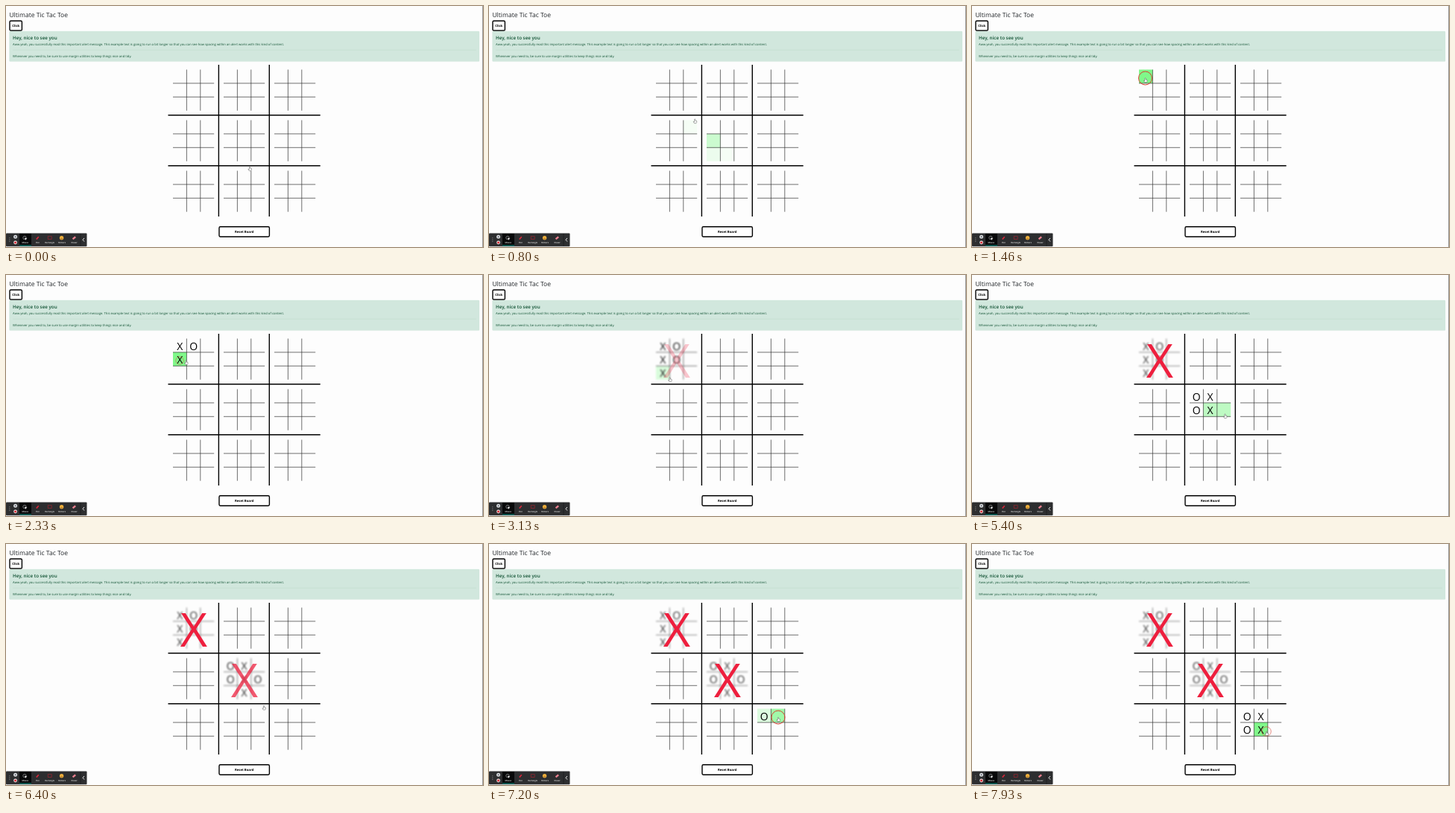
Animation, 640 px wide and 324 px high, one loop 8000 ms. Source, as an HTML page:

```html
<!DOCTYPE html>
<html lang="en">
<head>
<meta charset="utf-8">
<title>Ultimate Tic Tac Toe</title>
<style>
  html, body { margin: 0; width: 100%; height: 100%; overflow: hidden; background: #fdfdfd; }
  svg { display: block; width: 100vw; height: 100vh; }
  text { font-family: "Open Sans", "Noto Sans", sans-serif; text-rendering: geometricPrecision; }
  .alert { fill: #0f5132; font-size: 4.19px; }
  .button rect { fill: #fff; stroke: #000; stroke-width: 1.4; }
  .button text { font-size: 4.25px; font-weight: 700; text-anchor: middle; }
  .thick { stroke: #000; stroke-width: 1.4; }
  .thin { stroke: #333; stroke-width: .7; fill: none; }
  .mark { font-size: 14px; text-anchor: middle; }
  .winner { font-size: 63px; text-anchor: middle; fill: #ee1f3e; }
  .tools text { font-size: 2.7px; font-weight: 600; text-anchor: middle; fill: #eee; }
</style>
</head>
<body>
<svg viewBox="0 0 640 324" preserveAspectRatio="none">
  <rect width="640" height="324" fill="#fdfdfd"/>
  <rect x="639" width="1" height="324" fill="#999"/>
  <text x="4.4" y="15.3" font-size="8.56" fill="#212529">Ultimate Tic Tac Toe</text>
  <g class="button">
    <rect x="5" y="20" width="16.4" height="13" rx="1.6"/>
    <text x="13.2" y="28">Click</text>
    <rect x="286" y="296.8" width="67.4" height="13.4" rx="1.6"/>
    <text x="319.7" y="305">Reset Board</text>
  </g>
  <g class="alert">
    <rect x="4.6" y="34" width="630.4" height="40.6" rx="1" fill="#d1e7dd" stroke="#c4dfd3" stroke-width=".3"/>
    <path d="M9 59.2H631" stroke="#b5d2c5" stroke-width=".4"/>
    <text x="9" y="44.8" font-size="6.28" font-weight="600" style="font-size:6.28px">Hey, nice to see you</text>
    <text x="9" y="52.9">Aww yeah, you successfully read this important alert message. This example text is going to run a bit longer so that you can see how spacing within an alert works with this kind of content.</text>
    <text x="9" y="68.7">Whenever you need to, be sure to use margin utilities to keep things nice and tidy.</text>
  </g>

  <g id="boards"></g>
  <path class="thick" d="M285.4 79V283M353.3 79V283M217.5 146.8H421.7M217.5 214.8H421.7"/>

  <g class="tools">
    <rect y="305.5" width="108.5" height="17.8" rx="1" fill="#2d2e30"/>
    <rect x="18" y="306" width="16" height="17" fill="#08090a"/>
    <path d="M18 322H34" stroke="#0b9c8c"/>
    <path d="M4.8 311.5V318" stroke="#aaa" stroke-dasharray=".8 1.6"/>
    <circle cx="12.6" cy="310.2" r="2.5" fill="#d8dcdd"/>
    <circle cx="12.6" cy="310.2" r="1" fill="#667"/>
    <circle cx="12.6" cy="318" r="2.4" fill="#eee"/>
    <circle cx="12.6" cy="318" r="1.6" fill="#d8323c"/>
    <circle cx="25" cy="311.6" r="2.2" fill="none" stroke="#bbb" stroke-width=".6"/>
    <path d="M25 311.4l3.4 1.4-1.5.6-.6 1.6z" fill="#fff"/>
    <path d="M40.8 313.6l3-3.4" stroke="#d8283c" stroke-width="1.6"/>
    <rect x="56.2" y="309.8" width="5" height="3.8" fill="none" stroke="#a32632" stroke-width=".7"/>
    <circle cx="74.6" cy="311.8" r="2.7" fill="#eeb03c"/>
    <path d="M73.2 312.4q1.4 1.6 2.8 0" stroke="#74401c" stroke-width=".6" fill="none"/>
    <path d="M89.6 313.4l3.6-3" stroke="#f08090" stroke-width="2.4"/>
    <path d="M100 306V323" stroke="#17181a" stroke-width=".7"/>
    <path d="M105 312l-2 2.3 2 2.3" stroke="#fff" stroke-width=".9" fill="none"/>
    <text x="25.8" y="318.8">Mouse</text>
    <text x="42.4" y="318.8">Pen</text>
    <text x="58.6" y="318.8">Rectangle</text>
    <text x="75" y="318.8">Stickers</text>
    <text x="91.6" y="318.8">Eraser</text>
  </g>

  <circle id="ring" fill="none" stroke="#d8402f"/>
  <path id="cursor" d="M-.6 .2Q0-.6 .6 .2V2L2.5 2.5V4.2L1.7 5.6H-.8L-2.1 3.4L-.6 3.6Z" fill="#fff" stroke="#555" stroke-width=".5"/>
</svg>
<script>
const LOOP = 8000, CELL = 18.4, PITCH = 68, LEFT = 224, TOP = 85.5;
const HOVER_FADE = 300, WIN_FADE = 620;
const START = { arrive: 0, click: 250, x: 327, y: 216 };

// Pointer arrival time, click time and position of every move.
const moves = [
  [1300, 1500, 232.5, 97], [1750, 1860, 251, 97], [2100, 2220, 233, 115],
  [2450, 2560, 251, 115], [2800, 2930, 234, 134],
  [3820, 3930, 301, 164], [4180, 4420, 319, 165.5], [4650, 4760, 301, 183],
  [5000, 5140, 319, 183], [5380, 5560, 339.5, 187], [5820, 5990, 320, 201],
  [6780, 6880, 369, 232], [7100, 7220, 388, 233], [7440, 7540, 369, 250],
  [7740, 7850, 395, 252]
].map(([arrive, click, x, y]) => ({ arrive, click, x, y }));
const stops = [START, ...moves];
const wins = { 0: 2930, 4: 5990 };

const clamp = v => Math.min(1, Math.max(0, v));
const smooth = v => (v = clamp(v), v * v * (3 - 2 * v));

function add(parent, tag, attributes, text = '') {
  const node = document.createElementNS('http://www.w3.org/2000/svg', tag);
  for (const name in attributes) node.setAttribute(name, attributes[name]);
  node.textContent = text;
  return parent.appendChild(node);
}

function cellAt(x, y) {
  const locate = d => {
    const board = Math.floor(d / PITCH), cell = Math.floor((d - board * PITCH) / CELL);
    return board >= 0 && board < 3 && cell < 3 ? [board, cell] : null;
  };
  const h = locate(x - LEFT), v = locate(y - TOP);
  return h && v ? { board: v[0] * 3 + h[0], cell: v[1] * 3 + h[1] } : null;
}

function pointer(t) {
  const next = stops.findIndex(s => s.arrive > t);
  if (next < 1) return stops[next < 0 ? stops.length - 1 : 0];
  const from = stops[next - 1], to = stops[next];
  const k = smooth((t - from.click) / (to.arrive - from.click));
  return { x: from.x + (to.x - from.x) * k, y: from.y + (to.y - from.y) * k };
}

function hovered(t) {
  const p = pointer(t), hit = cellAt(p.x, p.y);
  return hit && !(t > wins[hit.board]) ? hit.board * 9 + hit.cell : -1;
}

const root = document.getElementById('boards'), cells = [], boards = [];
for (let b = 0; b < 9; b++) {
  const x = LEFT + b % 3 * PITCH, y = TOP + Math.floor(b / 3) * PITCH, size = CELL * 3;
  const group = add(root, 'g', {});
  for (let c = 0; c < 9; c++) {
    cells.push(add(group, 'rect', {
      x: x + c % 3 * CELL, y: y + Math.floor(c / 3) * CELL,
      width: CELL, height: CELL, fill: '#80f88a'
    }));
  }
  const lines = [1, 2].map(i =>
    `M${x + i * CELL} ${y}v${size}M${x} ${y + i * CELL}h${size}`).join('');
  add(group, 'path', { class: 'thin', d: lines });
  const winner = add(root, 'text', { class: 'winner', x: x + size / 2 + .4, y: y + size / 2 + 25 }, 'X');
  boards.push({ group, winner });
}

moves.forEach((move, i) => {
  const { board, cell } = cellAt(move.x, move.y);
  move.mark = add(boards[board].group, 'text', {
    class: 'mark',
    x: LEFT + board % 3 * PITCH + (cell % 3 + .5) * CELL,
    y: TOP + Math.floor(board / 3) * PITCH + (Math.floor(cell / 3) + .5) * CELL + 5.8
  }, 'XO'[i % 2]);
});

const ring = document.getElementById('ring'), cursor = document.getElementById('cursor');

function draw(t) {
  // Averaging the recent past gives each cell a linear hover fade.
  const glow = new Array(81).fill(0), samples = 30;
  for (let i = 0; i < samples; i++) {
    const index = hovered(t - i * HOVER_FADE / samples);
    if (index >= 0) glow[index] += 1 / samples;
  }
  cells.forEach((cell, i) => cell.setAttribute('fill-opacity', glow[i]));

  moves.forEach(m => m.mark.setAttribute('visibility', t >= m.click ? 'visible' : 'hidden'));

  boards.forEach(({ group, winner }, b) => {
    const k = b in wins ? smooth((t - wins[b]) / WIN_FADE) : 0;
    group.style.filter = k ? `blur(${Math.min(1, k * 3) * 1.1}px)` : 'none';
    group.style.opacity = 1 - .2 * k;
    winner.style.opacity = k;
  });

  const p = pointer(t);
  cursor.setAttribute('transform', `translate(${p.x} ${p.y})`);
  const press = moves.find(m => t > m.click - 110 && t < m.click + 200);
  const grow = press ? clamp((t - press.click + 110) / 60) : 0;
  const fade = press ? clamp((t - press.click) / 200) : 1;
  ring.setAttribute('cx', press ? press.x : p.x);
  ring.setAttribute('cy', press ? press.y : p.y);
  ring.setAttribute('r', 9 * grow * (1 - .75 * fade));
  ring.setAttribute('opacity', press ? 1 - fade : 0);
}

const begin = performance.now();
function tick() {
  draw((performance.now() - begin) % LOOP);
  requestAnimationFrame(tick);
}
tick();
</script>
</body>
</html>
```
